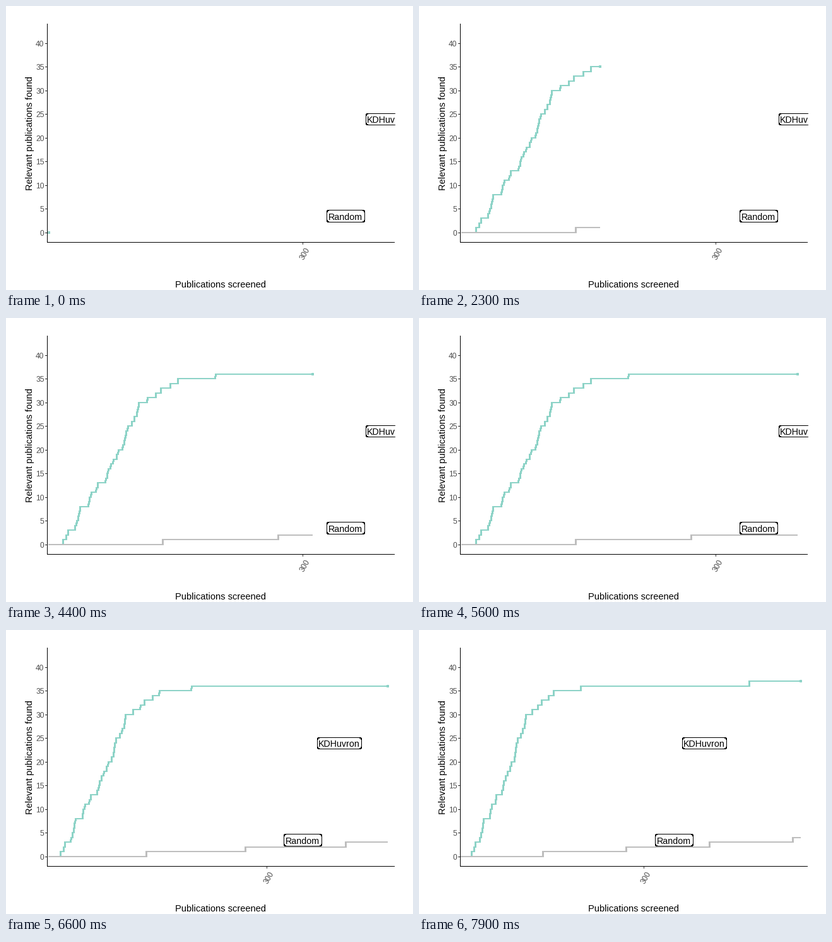
These frames come from a looping animation (645x450 px, 8 s). A matplotlib script:

```python
import numpy as np
import matplotlib.pyplot as plt
from matplotlib.animation import FuncAnimation
from matplotlib.patches import Circle, FancyBboxPatch, Rectangle

W, H, DPI = 645, 450, 100
FRAMES, INTERVAL = 80, 100
LEFT, RIGHT, TOP, BOTTOM = 65.4, 616, 28, 374
BASE_Y, UNIT_Y = 358.9, 7.5
MIN_SPAN = 400          # the x axis grows once the count passes this
GREEN, GREY = "#8DD3C7", "#BEBEBE"
CRISP = dict(antialiased=False, snap=False)

# publication counts at which one more relevant item is found
ACTIVE_HITS = [19, 23, 25, 33, 35, 37, 38, 39, 49, 50, 52, 58, 60, 69, 71, 72,
               75, 78, 82, 84, 89, 91, 92, 93, 95, 100, 103, 106, 107, 108,
               118, 128, 134, 145, 154, 198, 474]
RANDOM_HITS = [136, 272, 409, 545]

plt.rcParams["font.family"] = "Liberation Sans"


def pt(px):
    return px * 72 / DPI


def whole(v):
    return np.floor(v + 0.5)


def y_pos(value):
    return BASE_Y - UNIT_Y * value


def screened(i):
    return 2.2 + 7.035 * i


def curve(hits, n):
    """Cumulative finds up to n, joined point to point."""
    counts = np.arange(1, int(n) + 2)
    found = np.searchsorted(hits, counts, side="right")
    x = np.append(counts[:-1], n)
    return x, np.interp(x, counts, found)


fig = plt.figure(figsize=(W / DPI, H / DPI), dpi=DPI, facecolor="white")
ax = fig.add_axes([0, 0, 1, 1])
ax.set_xlim(0, W)
ax.set_ylim(H, 0)
ax.axis("off")

panel = Rectangle((65, TOP), RIGHT + 1 - 65, BOTTOM + 1 - TOP,
                  transform=ax.transData)


def stroke(x, y, color, px, z):
    line, = ax.plot(x, y, color=color, lw=pt(px), zorder=z,
                    solid_capstyle="butt", solid_joinstyle="round", **CRISP)
    return line


def write(x, y, s, px, color="black", **kw):
    return ax.text(x, y, s, fontsize=pt(px), color=color, va="baseline",
                   rotation_mode="anchor", **kw)


class Tag:
    """Rounded label pinned to a data position."""

    def __init__(self, s, x, value, width):
        self.x, self.width = x, width
        cy = y_pos(value)
        top, bottom = whole(cy - 9.25), whole(cy + 9.25)
        self.box = FancyBboxPatch((0, top + 0.5), width, bottom - top,
                                  boxstyle="round,pad=0,rounding_size=3",
                                  fc="white", ec="black", lw=pt(1), zorder=5,
                                  **CRISP)
        self.text = write(0, whole(cy + 6), s, 14.3, ha="center", zorder=6,
                          clip_on=True)
        ax.add_patch(self.box)
        for part in (self.box, self.text):
            part.set_clip_path(panel)

    def place(self, to_px):
        cx = to_px(self.x)
        self.box.set_x(whole(cx - self.width / 2) + 0.5)
        self.text.set_x(cx - 0.2)


# fixed axes
stroke([65.5, 65.5], [TOP, BOTTOM + 1], "black", 1, 8)
stroke([65, RIGHT], [BOTTOM + 0.5, BOTTOM + 0.5], "black", 1, 8)
for v in range(0, 41, 5):
    y = whole(y_pos(v))
    stroke([62, 65], [y + 0.5, y + 0.5], "#333333", 1, 7)
    write(60.5, y + 5, str(v), 12, "#4D4D4D", ha="right")
write(340.3, 446, "Publications screened", 14.67, ha="center")
write(42, 201.5, "Relevant publications found", 14.67, ha="center", rotation=90)

# moving parts
x_tick = stroke([0, 0], [BOTTOM + 1, BOTTOM + 4], "#333333", 1, 7)
x_text = write(0, 394.2, "300", 12, "#4D4D4D", ha="center", rotation=60)
active = stroke([], [], GREEN, 2, 2)
chance = stroke([], [], GREY, 2, 4)
dot = ax.add_patch(Circle((0, 0), 2, fc=GREEN, lw=0, zorder=3, **CRISP))
for part in (active, chance):
    part.set_clip_path(panel)
tags = [Tag("KDHuvron", 400, 24, 70), Tag("Random", 350, 3.5, 60)]


def update(i):
    n = screened(i)
    scale = (RIGHT - LEFT) / (1.02 * max(MIN_SPAN, n))

    def to_px(x):
        return LEFT + x * scale

    for line, hits in ((active, ACTIVE_HITS), (chance, RANDOM_HITS)):
        x, found = curve(hits, n)
        line.set_data(whole(to_px(x)), whole(y_pos(found)))
    dot.center = active.get_xdata()[-1], active.get_ydata()[-1]

    tick = whole(to_px(300)) + 0.5
    x_tick.set_xdata([tick, tick])
    x_text.set_x(tick + 6)
    for tag in tags:
        tag.place(to_px)
    return []


anim = FuncAnimation(fig, update, frames=FRAMES, interval=INTERVAL,
                     init_func=lambda: update(0), repeat=True,
                     repeat_delay=0, blit=False)
plt.show()
```
